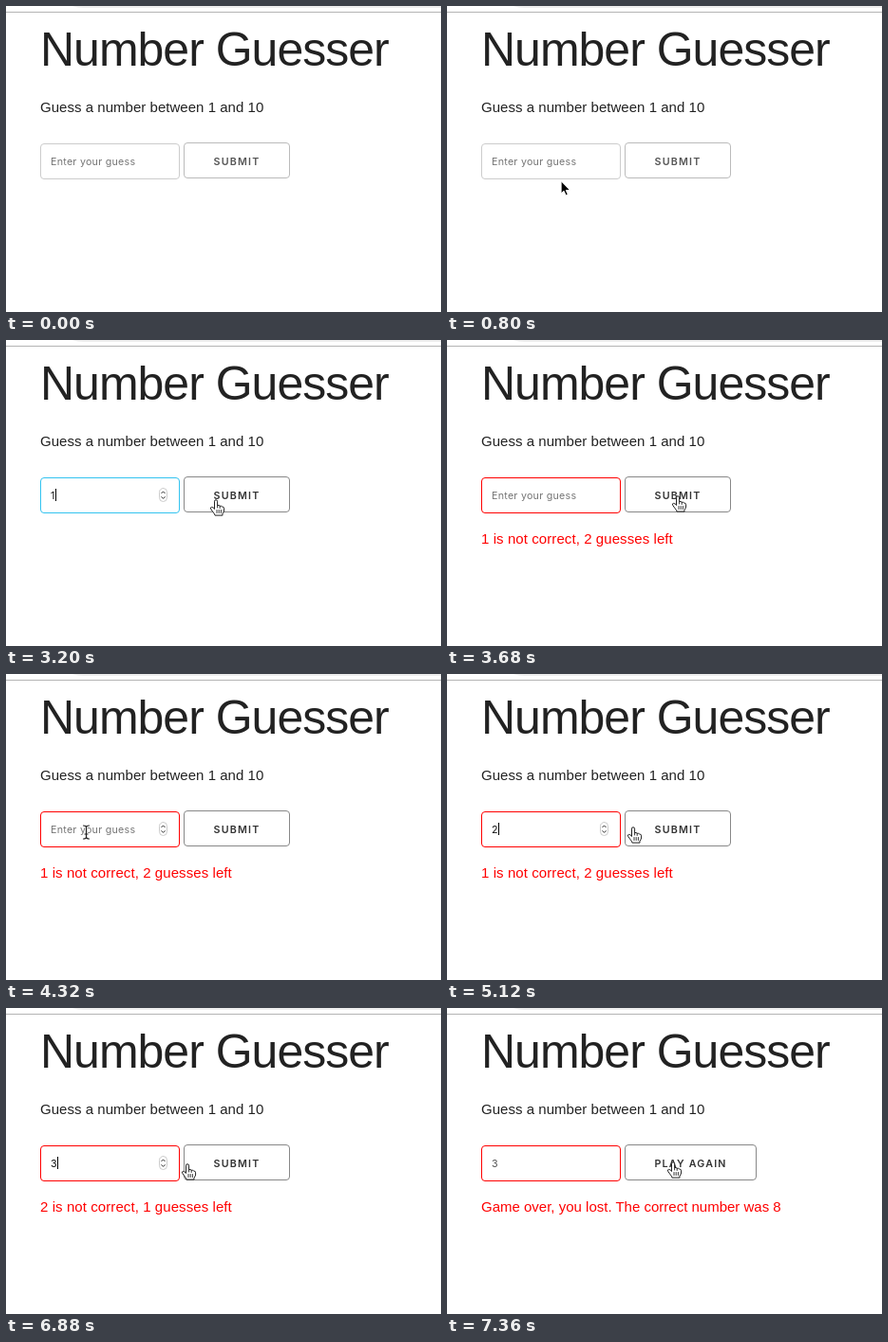
Write an HTML page that moves like this. It is 458 px wide and 323 px high and loops after 8 s.

```html
<!DOCTYPE html>
<html lang="en">
<head>
<meta charset="utf-8">
<title>Number Guesser</title>
<style>
  html, body { margin: 0; width: 100%; height: 100%; overflow: hidden; background: #fff; }
  svg { display: block; }
  text { font: 15px "Liberation Sans", Arial, sans-serif; fill: #222; white-space: pre; }
  .title { font-size: 50px; letter-spacing: -1px; }
  .ui { font: 10.7px Inter, sans-serif; letter-spacing: .25px; }
  #label { font-weight: 600; letter-spacing: 1.2px; }
  #message { fill: #f00; }
  .line { fill: none; stroke-linecap: round; stroke-linejoin: round; }
</style>
</head>
<body>
<svg width="458" height="323" viewBox="0 0 458 323">
  <path d="M70 0Q75 2 82 2H458V0Z" fill="#eee"/>
  <rect y="6" width="458" height="1" fill="#b4b4b4"/>
  <text class="title" x="36" y="63">Number Guesser</text>
  <text x="36" y="112" letter-spacing=".03">Guess a number between 1 and 10</text>

  <rect id="field" x="36.5" y="145.5" width="146" height="37" rx="3.5" fill="#fff"/>
  <text id="value" class="ui" x="47" y="168"></text>
  <rect id="caret" y="157" width="1" height="13"/>
  <g id="spinner" class="line">
    <rect x="161.5" y="156.5" width="8" height="14" rx="4" stroke="#ccc"/>
    <path d="M163.8 161.7l1.7-1.8 1.7 1.8M163.8 165.6l1.7 1.8 1.7-1.8" stroke="#333"/>
  </g>

  <rect id="button" x="187.5" y="144.5" height="37" rx="3.5" fill="#fff"/>
  <text id="label" class="ui" x="218.5" y="168"></text>
  <text id="message" x="36" y="215"></text>

  <g id="cursor" class="line">
    <path id="arrow" d="M0 0V13L3 10.3 5 15 7.2 14.1 5.2 9.5H9.3Z" style="fill:#000" stroke="#fff"/>
    <g id="beam">
      <path d="M-3-7Q0-7 0-5Q0-7 3-7M0-5V5M-3 7Q0 7 0 5Q0 7 3 7M-1.5 2H1.5" stroke="#fff" stroke-width="2.6"/>
      <path d="M-3-7Q0-7 0-5Q0-7 3-7M0-5V5M-3 7Q0 7 0 5Q0 7 3 7M-1.5 2H1.5" stroke="#222" stroke-width="1.2"/>
    </g>
    <g id="hand" stroke="#222" transform="translate(-1 -1.5)">
      <path style="fill:#fff" d="M-1.5 9.5V1.7Q-1.5.3 0 .3T1.6 1.7V6.2Q3.3 5.3 4.2 6.8 5.8 6 6.6 7.6 8.6 7.3 8.6 9.3V11.5Q8.2 13.5 7 14.8V16.6H-1Q-1.4 14.7-3.4 12.6L-5.4 9.7Q-6 8-4.5 7.9-3 8-1.5 9.5Z"/>
      <path d="M1.6 6.2V8.5M4.2 6.8V9M1 11V14M3.2 11V14M5.4 11V14" stroke-width=".9"/>
    </g>
  </g>
</svg>
<script>
const LOOP = 8000, STEP = 160;
const $ = id => document.getElementById(id);
const show = (id, on) => $(id).setAttribute("visibility", on ? "visible" : "hidden");

// pointer hotspot: time, x, y
const path = [
  [160, 414, 301], [960, 86, 171.5], [1760, 86, 171.5], [1920, 83.5, 164],
  [2880, 83.5, 164], [3200, 222, 170], [3520, 244, 166], [3840, 244, 166],
  [4160, 130, 162], [4320, 84.5, 167], [4800, 84.5, 167], [5120, 197, 163],
  [5440, 236, 167], [5600, 236, 167], [5920, 87.5, 159], [6080, 86, 162],
  [6560, 86, 162], [6880, 192, 166], [7200, 239, 164], [LOOP, 239, 164]
];

// each round: field clicked, number typed, guess submitted
const rounds = [
  { focus: 1920, type: 2880, submit: 3520, value: "1", reply: "1 is not correct, 2 guesses left" },
  { focus: 4640, type: 4960, submit: 5440, value: "2", reply: "2 is not correct, 1 guesses left" },
  { focus: 6080, type: 6400, submit: 7200, value: "3", reply: "Game over, you lost. The correct number was 8" }
];

function pointer(t) {
  const i = Math.max(1, path.findIndex(p => p[0] > t));
  const [t0, x0, y0] = path[i - 1], [t1, x1, y1] = path[i];
  const k = Math.max(0, (t - t0) / (t1 - t0));
  const ease = k * k * (3 - 2 * k);
  return [x0 + (x1 - x0) * ease, y0 + (y1 - y0) * ease];
}

function draw(t) {
  const [x, y] = pointer(t);
  const over = rounds[2].submit <= t;
  const active = rounds.find(r => t >= r.focus && t < r.submit);
  const last = rounds.filter(r => t >= r.submit).pop();
  const typed = over ? "3" : active && t >= active.type ? active.value : "";
  const visible = t >= path[0][0];
  const inField = visible && x >= 36 && x < 183 && y >= 145 && y < 183;
  const inButton = visible && x >= 187 && x < (over ? 326 : 299) && y >= 144 && y < 182;
  const lit = inButton || (last && !active);

  $("field").setAttribute("stroke", last ? "#f00" : active ? "#33c3f0" : "#ccc");
  $("value").textContent = typed || "Enter your guess";
  $("value").style.fill = over ? "#545454" : typed ? "#111" : "#757575";
  $("caret").setAttribute("x", typed ? Math.ceil(47 + $("value").getComputedTextLength()) : 47);
  show("caret", active && !(t >= 2400 && t < 2880));
  show("spinner", !over && (active || inField));

  $("button").setAttribute("width", over ? 138 : 111);
  $("button").setAttribute("stroke", lit ? "#888" : "#bbb");
  $("label").textContent = over ? "PLAY AGAIN" : "SUBMIT";
  $("label").style.fill = lit ? "#333" : "#555";
  $("message").textContent = last ? last.reply : "";
  $("message").style.letterSpacing = over ? "0" : ".08px";

  $("cursor").setAttribute("transform", `translate(${x} ${y})`);
  show("beam", inField && !over);
  show("hand", inButton);
  show("arrow", visible && !inField && !inButton);
}

function frame() {
  const t = performance.now() % LOOP;
  draw(Math.floor(t / STEP) * STEP);
  requestAnimationFrame(frame);
}
frame();
</script>
</body>
</html>
```
